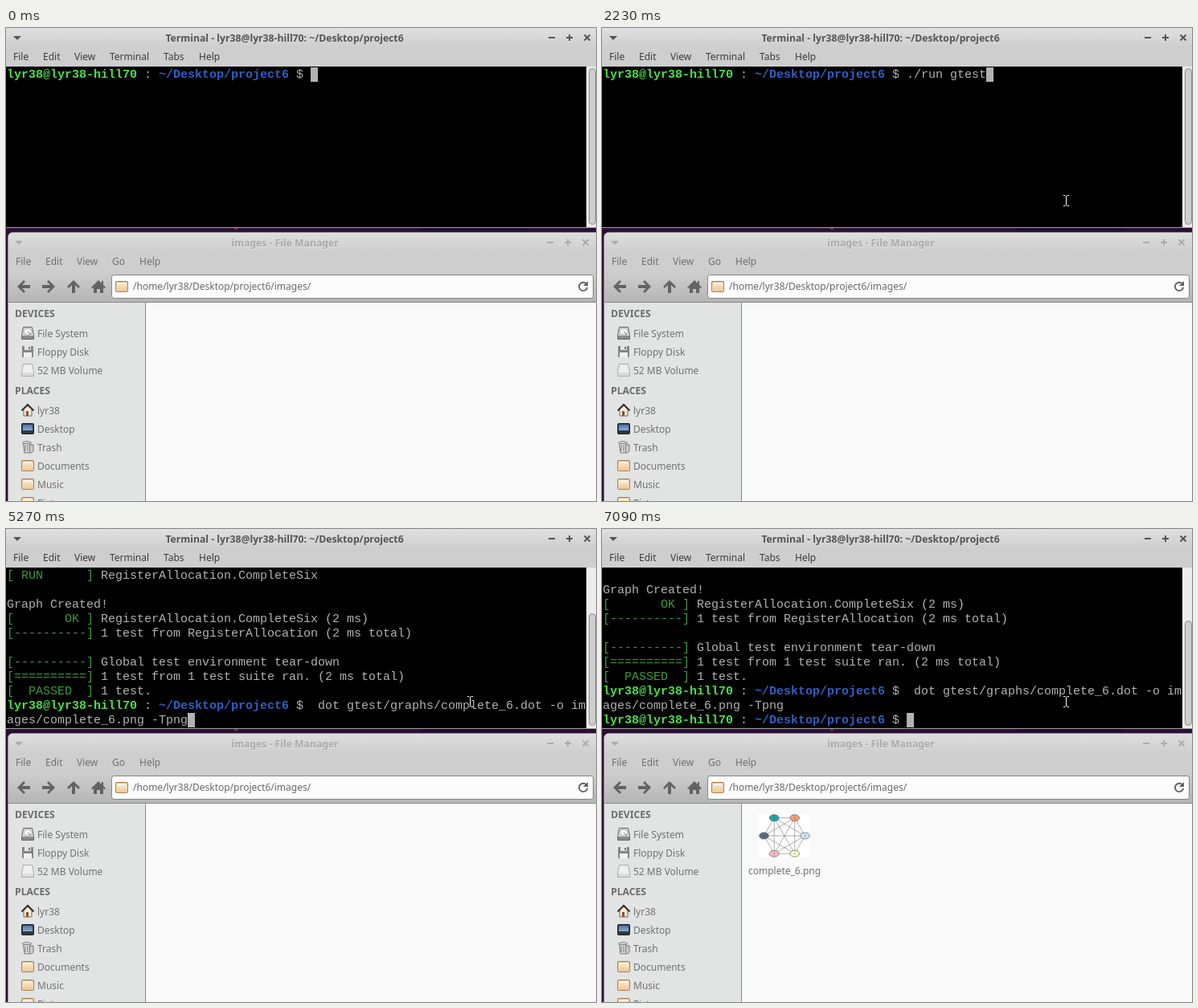
Animation, 734 px wide and 589 px high, one loop 8000 ms. Source, as an HTML page with a canvas:

```html
<!DOCTYPE html>
<html lang="en">
<head>
<meta charset="utf-8">
<title>Terminal and file manager</title>
<style>
html, body { margin: 0; width: 100%; height: 100%; overflow: hidden; background: #000; }
canvas { display: block; }
</style>
</head>
<body>
<canvas id="stage" width="734" height="589"></canvas>
<script>
const ctx = document.getElementById('stage').getContext('2d');
const LOOP = 8000, ROWS = 11, CELL = 9, LINE = 18;
const USER = 'lyr38', HOST = USER + '-hill70', DIR = '~/Desktop/project6';
const UI = '12px "Noto Sans", "Open Sans", sans-serif';
const UI_BOLD = 'bold 12.2px "Noto Sans", "Open Sans", sans-serif';
const MONO = '15px "Liberation Mono", monospace';

// ---- drawing helpers ----
function rect(x, y, w, h, fill) {
  ctx.fillStyle = fill;
  ctx.fillRect(x, y, w, h);
}
function fade(y, h, top, bottom) {
  const g = ctx.createLinearGradient(0, y, 0, y + h);
  g.addColorStop(0, top);
  g.addColorStop(1, bottom);
  return g;
}
function text(s, x, y, color, font = UI, align = 'left') {
  ctx.font = font;
  ctx.textAlign = align;
  ctx.fillStyle = color;
  ctx.fillText(s, x, y);
}
function box(x, y, w, h, r, fill, stroke) {
  ctx.beginPath();
  ctx.roundRect(x, y, w, h, r);
  if (fill) { ctx.fillStyle = fill; ctx.fill(); }
  if (stroke) { ctx.strokeStyle = stroke; ctx.lineWidth = 1; ctx.stroke(); }
}
function shape(d, x, y, fill, stroke, width = 1) {
  const p = new Path2D(d);
  ctx.save();
  ctx.translate(x, y);
  if (fill) { ctx.fillStyle = fill; ctx.fill(p); }
  if (stroke) { ctx.strokeStyle = stroke; ctx.lineWidth = width; ctx.stroke(p); }
  ctx.restore();
}
function ellipse(x, y, rx, ry, fill, stroke) {
  ctx.beginPath();
  ctx.ellipse(x, y, rx, ry, 0, 0, 7);
  ctx.fillStyle = fill;
  ctx.fill();
  if (stroke) { ctx.strokeStyle = stroke; ctx.lineWidth = 0.6; ctx.stroke(); }
}

// ---- window chrome ----
function titleButtons(x, y, color) {
  shape('M-5 -2H5L0 3Z', x, y, color);
  const right = 679 + (x > 14 ? -2 : 0);
  shape('M-4 0H4', right, y, null, color, 2);
  shape('M-4 0H4M0 -4V4', right + 22, y, null, color, 2);
  shape('M-3.5 -3.5L3.5 3.5M3.5 -3.5L-3.5 3.5', right + 44, y, null, color, 2);
}
function menu(items, y, color) {
  for (const [label, x] of items) text(label, x, y, color);
}

// ---- terminal ----
const GREY = '#b2b2b2', GREEN = '#3c9a3c';
const PROMPT = '$';
const REPORT = [
  '[----------] 1 test from RegisterAllocation',
  '[ RUN      ] RegisterAllocation.CompleteSix',
  '',
  'Graph Created!',
  '[       OK ] RegisterAllocation.CompleteSix (2 ms)',
  '[----------] 1 test from RegisterAllocation (2 ms total)',
  '',
  '[----------] Global test environment tear-down',
  '[==========] 1 test from 1 test suite ran. (2 ms total)',
  '[  PASSED  ] 1 test.'
];
const COMMAND = [PROMPT + ' dot gtest/graphs/complete_6.dot -o im', 'ages/complete_6.png -Tpng'];
const TYPED = './run gtest';
const KEYS = [1080, 1080, 1280, 1340, 1410, 1590, 1720, 1890, 1990, 2160, 2230];

function screenLines(t) {
  if (t < 2820) return [PROMPT + TYPED.slice(0, KEYS.filter(k => t >= k).length)];
  if (t < 5270) return [...REPORT, PROMPT];
  if (t < 6860) return [...REPORT, ...COMMAND];
  return [...REPORT, ...COMMAND, t < 6930 ? '' : PROMPT];
}
function run(s, col, y, color, bold) {
  text(s, 1 + col * CELL, y, color, (bold ? 'bold ' : '') + MONO);
  return col + s.length;
}
function printLine(s, y) {
  let col = 0;
  if (s[0] === PROMPT) {
    col = run(USER + '@' + HOST, col, y, '#4be04b', true);
    col = run(' : ', col, y, GREY);
    col = run(DIR, col, y, '#2f5fc4', true);
    col = run(' $ ', col, y, GREY);
    s = s.slice(1);
  } else if (s[0] === '[') {
    col = run(s.slice(0, 12), col, y, GREEN);
    s = s.slice(12);
  }
  return run(s, col, y, GREY);
}
function terminal(t) {
  rect(0, 0, 734, 24, fade(0, 24, '#e0e0e0', '#cecece'));
  rect(0, 24, 734, 24, '#cecece');
  titleButtons(14, 12, '#555');
  text(`Terminal - ${USER}@${HOST}: ${DIR}`, 346.5, 17, '#555', UI_BOLD, 'center');
  menu([['File', 9], ['Edit', 46], ['View', 85], ['Terminal', 129], ['Tabs', 196], ['Help', 240]], 40, '#3c3c3c');

  rect(0, 48, 722, 200, '#000');
  rect(722, 48, 12, 200, '#ececec');
  const top = t < 2820 ? 50 : t < 5240 ? 94 : t < 6830 ? 105 : 114;
  box(725.5, top + 0.5, 8, 244 - top, 4, '#cecece', '#8a8a8a');

  let end = 0, row = 0;
  const lines = screenLines(t).slice(-ROWS);
  lines.forEach((s, i) => { end = printLine(s, 62 + i * LINE); row = i; });
  rect(1 + end * CELL, 49 + row * LINE, CELL, LINE, GREY);
  rect(0, 248, 734, 1, '#a0a0a0');
}

// ---- file manager ----
function folder(x, y) {
  box(x + 0.5, y + 0.5, 15, 13, 1, '#e3bd88', '#a98253');
  rect(x + 2, y + 2, 12, 2, '#fbf3e6');
  rect(x + 1, y + 4, 14, 9, fade(y + 4, 9, '#f8e4c6', '#ecc798'));
}
function drive(x, y, dark) {
  shape('M2.5 .5H13.5L15.5 10.5V15.5H.5V10.5Z', x, y, dark ? '#d8d8d8' : '#efefef', dark ? '#666' : '#aaa');
  if (dark) {
    ellipse(x + 8, y + 6, 5, 4, '#f4f4f4', '#888');
    shape('M8 6L12 10', x, y, null, '#777');
  }
  rect(x + 1, y + 11, 14, 4, dark ? '#8b8b8b' : '#dcdcdc');
}
function floppy(x, y) {
  box(x + 1, y + 1, 14, 14, 1, '#858585');
  rect(x + 4, y + 1, 8, 5, '#e4e4e4');
  rect(x + 9, y + 2, 2, 3, '#777');
  rect(x + 3, y + 9, 10, 6, '#f0f0f0');
}
function house(x, y) {
  shape('M3 7L8 2L13 7V15H3Z', x, y, '#f3ead8', '#765');
  rect(x + 6, y + 9, 3, 6, '#8a5230');
  shape('M.5 8.5L8 1L15.5 8.5', x, y, null, '#3d2b22', 2);
}
function desktop(x, y) {
  box(x + 0.5, y + 1.5, 15, 13, 1, '#2c3e58', '#222');
  rect(x + 2, y + 3, 12, 7, fade(y + 3, 7, '#4d76a8', '#8bacd0'));
  rect(x + 1, y + 11, 14, 3, '#30343c');
}
function trash(x, y) {
  shape('M2.5 3.5H11.5L10.5 15H4Z', x, y, '#dedede', '#777');
  shape('M1 2.5Q7 -1 13 2.5M5 5V13M8 5V13', x, y, null, '#777');
  shape('M10.5 5H15V12Q15 15 10.5 15Z', x, y, '#ccc', '#777');
}
const PLACES = [
  ['File System', 380, (x, y) => drive(x, y, true)],
  ['Floppy Disk', 403, floppy],
  ['52 MB Volume', 426, (x, y) => drive(x, y, false)],
  [USER, 476, house],
  ['Desktop', 499, desktop],
  ['Trash', 522, trash],
  ['Documents', 545, folder],
  ['Music', 568, folder],
  ['Pictures', 591, folder]
];
const NODES = ['#d0e2fa', '#fdfdc8', '#f6b9c4', '#566f82', '#1ea6a6', '#fb9c78'];

function graphThumb() {
  rect(195, 355, 64, 54, '#fff');
  const pts = NODES.map((c, i) => {
    const a = i * Math.PI / 3;
    return [227 + 25.5 * Math.cos(a), 382 + 25.7 * Math.sin(a)];
  });
  ctx.strokeStyle = '#777';
  ctx.lineWidth = 0.6;
  ctx.beginPath();
  pts.forEach(([x, y], i) => pts.slice(i + 1).forEach(([u, v]) => {
    ctx.moveTo(x, y);
    ctx.lineTo(u, v);
  }));
  ctx.stroke();
  pts.forEach(([x, y], i) => {
    ellipse(x, y, 5.8, 4, NODES[i], '#444');
    rect(x - 0.5, y - 1, 1, 2, '#0006');
  });
}
function genericImage() {
  box(203.5, 358.5, 47, 47, 2, '#fff', '#999');
  rect(208, 363, 38, 38, fade(363, 38, '#9fc0e2', '#dce9f4'));
  shape('M0 22L12 10L22 19L29 13L38 22V26H0Z', 208, 375, '#7c9b68');
}
function fileManager(t) {
  rect(0, 249, 734, 340, '#2b1035');
  rect(284, 249, 4, 2, '#7a3545');
  rect(516, 249, 132, 3, '#1d0d2c');
  box(2.5, 254.5, 740, 350, [6, 0, 0, 0], '#cecece', '#8a8a8a');
  box(3, 255, 731, 24, [5, 0, 0, 0], fade(255, 24, '#dedede', '#cecece'));
  titleButtons(16, 267, '#acacac');
  text('images - File Manager', 347, 273, '#e4e4e4', UI_BOLD, 'center');
  text('images - File Manager', 347, 272, '#aaa', UI_BOLD, 'center');
  menu([['File', 12], ['Edit', 49], ['View', 88], ['Go', 132], ['Help', 166]], 295, '#707070');

  rect(3, 303, 731, 38, fade(303, 38, '#cecece', '#b5b5b5'));
  rect(3, 341, 731, 1, '#8a8a8a');
  const left = 'M-8 0L0 -8L2 -6L-2 -2H8V2H-2L2 6L0 8Z';
  shape(left, 22, 322, '#636363');
  shape('M8 0L0 -8L-2 -6L2 -2H-8V2H2L-2 6L0 8Z', 53, 322, '#636363');
  shape('M0 -8L-8 0L-6 2L-2 -2V8H2V-2L6 2L8 0Z', 84, 322, '#636363');
  shape('M0 -8L-9 1L-7.5 2.5L-6 1V8H-2V3H2V8H6V1L7.5 2.5L9 1L6 -2V-7H4V-4Z', 115, 322, '#636363');
  box(131.5, 307.5, 599, 29, 3, '#fcfcfc', '#858585');
  folder(136, 315);
  text(`/home/${USER}/Desktop/project6/images/`, 158, 326, '#686868');
  shape('M4 -3.5A5.2 5.2 0 1 0 5.2 1', 718, 322, null, '#606060', 1.8);
  shape('M6 -7V-1H0Z', 718, 322, '#606060');

  rect(3, 342, 170, 247, '#e1e4e3');
  rect(173, 342, 1, 247, '#8a8a8a');
  rect(174, 342, 560, 247, '#f9f9f9');
  text('DEVICES', 11, 360, '#6c6c6c', UI_BOLD);
  text('PLACES', 11, 456, '#6c6c6c', UI_BOLD);
  for (const [label, y, icon] of PLACES) {
    icon(19, icon === folder ? y - 7 : y - 8);
    text(label, 39, y + 5, '#717171');
  }
  if (t >= 6990) {
    if (t < 7090) genericImage(); else graphThumb();
    text('complete_6.png', 227, 430, '#717171', UI, 'center');
  }
}

// ---- mouse pointer ----
function pointer(t) {
  if (t < 30) return;
  const k = Math.min(10, Math.floor((t - 30) / 38));
  const p = Math.min(1, k / 8), e = 1 - (1 - p) ** 2;
  const settle = Math.max(0, (k - 8) / 2);
  const x = Math.round(685 - 114 * e + 6 * settle);
  const y = Math.round(575 - 366 * e + 6 * settle);
  if (y > 252) {
    shape('M0 0V15L3.5 12L6 17.5L8.5 16.5L6 11H10.5Z', x, y, '#000', '#fff');
    return;
  }
  const beam = 'M-3 -6.5H-.5M1.5 -6.5H4M.5 -6V6M-3 6.5H-.5M1.5 6.5H4';
  shape(beam, x, y, null, '#000', 3);
  shape(beam, x, y, null, '#fff', 1);
}

const start = performance.now();
function frame() {
  const t = (performance.now() - start) % LOOP;
  fileManager(t);
  terminal(t);
  pointer(t);
  requestAnimationFrame(frame);
}
frame();
</script>
</body>
</html>
```
